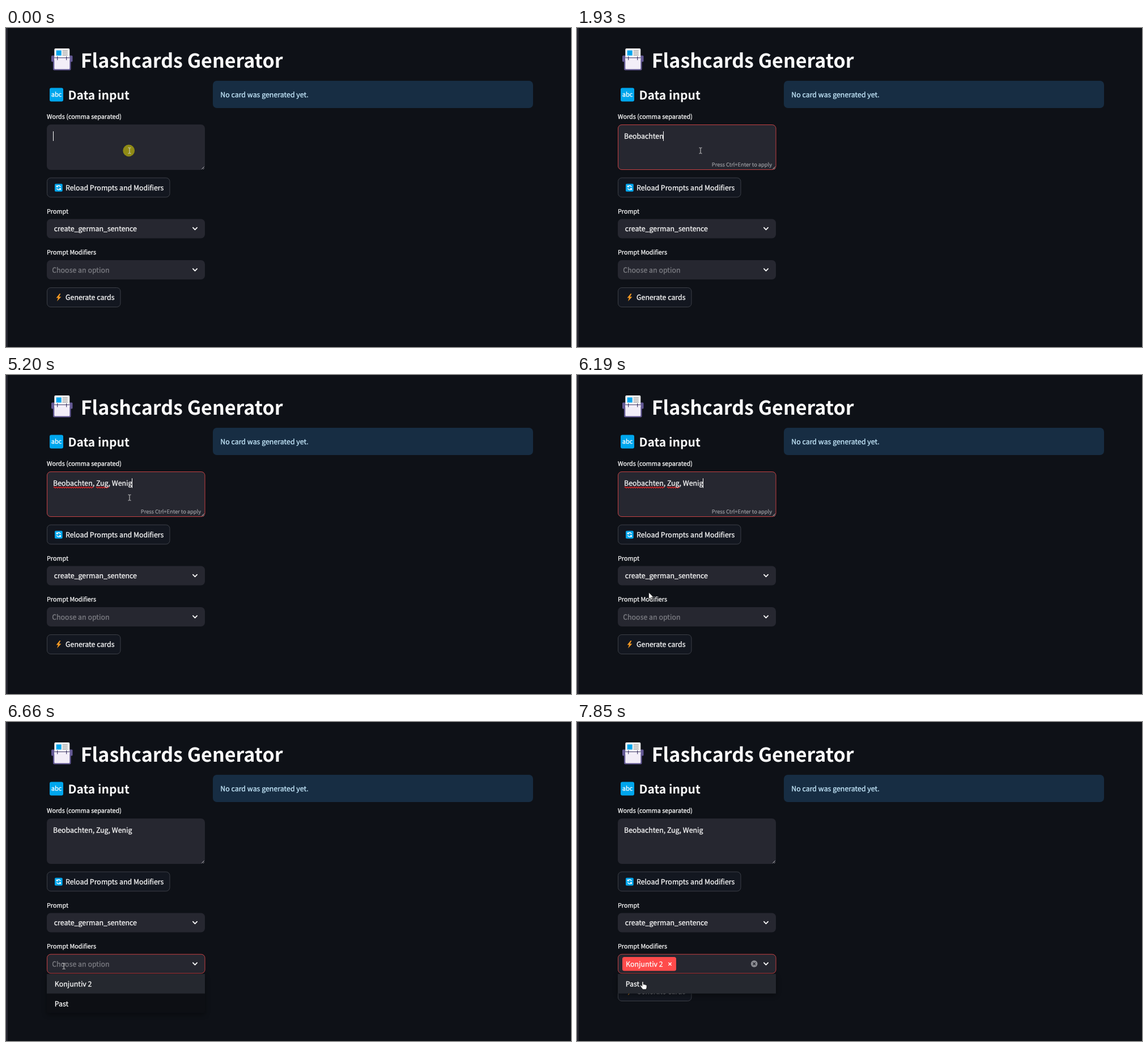
An HTML page for the animation above (7990 ms loop, 997 by 562 pixels).

```html
<!DOCTYPE html>
<html lang="en">
<head>
<meta charset="utf-8">
<title>Flashcards Generator</title>
<style>
  html, body { margin: 0; width: 100%; height: 100%; overflow: hidden; background: #0e1117; }
  svg { display: block; width: 997px; height: 562px; }
  text {
    font: 12.4px "Noto Sans CJK JP", "Noto Sans CJK SC", "Noto Sans CJK KR", "Noto Sans CJK", "Open Sans", sans-serif;
    color: #fafafa; fill: currentColor; stroke: currentColor; stroke-width: .28;
    white-space: pre; text-rendering: geometricPrecision;
  }
  .title { font-size: 34.05px; font-weight: 700; stroke: none; }
  .head { font-size: 21.05px; font-weight: 600; stroke: none; }
  .label { font-size: 10.8px; }
  .hint { font-size: 9.27px; color: #a3a4a8; text-anchor: end; stroke-width: .15; }
  .muted { color: #7d7e84; }
  .info { color: #c7ebff; }
  .abc { font-size: 11px; text-anchor: middle; color: #fff; }
  .field { fill: #262730; }
  .focus { fill: none; stroke: #ff4b4b; stroke-width: .86; }
  .btn { fill: #131720; stroke: #41444c; stroke-width: .9; }
  .line { fill: none; stroke: #fafafa; stroke-width: 1.8; stroke-linecap: round; stroke-linejoin: round; }
  .wave { fill: none; stroke: #f02424; stroke-width: 1.2; }
</style>
</head>
<body>
<svg viewBox="0 0 997 562">
  <defs>
    <path id="chevron" class="line" d="M-3.6-1.8 0 1.8 3.6-1.8"/>
    <filter id="shadow" x="-10%" y="-30%" width="120%" height="180%" color-interpolation-filters="sRGB">
      <feDropShadow dx="0" dy="3" stdDeviation="4" flood-color="#000" flood-opacity=".4"/>
    </filter>
  </defs>
  <rect width="997" height="562" fill="#0e1117"/>
  <rect width="3" height="562" fill="#262730"/>

  <!-- card box icon -->
  <g>
    <rect x="80" y="48.5" width="37.500" height="11" rx="1.5" fill="#635994"/>
    <rect x="83" y="50" width="31.500" height="24.5" rx="2.5" fill="#635994"/>
    <rect x="85.3" y="36" width="27" height="22" rx="2" fill="#f4f4f4"/>
    <rect x="88.7" y="39.5" width="9" height="9" fill="#00a6ed"/>
    <path d="M99.7 40.5h9M99.7 44h9M99.7 47.5h9" stroke="#9b9b9b" stroke-width="1.3"/>
    <rect x="85.3" y="52" width="27" height="20.5" rx="1.5" fill="#f3eef8"/>
    <path d="M85.3 52.5h27M90.7 50v6.5M106.7 50v6.5" stroke="#433b6b" stroke-width="1.2"/>
  </g>
  <text class="title" x="131.7" y="69.5">Flashcards Generator</text>

  <rect x="77" y="105.5" width="24" height="24" rx="3" fill="#00a6ed"/>
  <text class="abc" x="89" y="121">abc</text>
  <text class="head" x="109.4" y="126">Data input</text>

  <rect x="365" y="93" width="565" height="48" rx="7" fill="#172d43"/>
  <text class="info" x="378.3" y="121.6">No card was generated yet.</text>

  <text class="label" x="72" y="160">Words (comma separated)</text>
  <rect class="field" x="72" y="170" width="279" height="80" rx="7"/>
  <rect id="areaFocus" class="focus" x="72.5" y="170.5" width="278.5" height="79" rx="6.5"/>
  <path d="M345.5 248.5l4-4M348.3 248.7l1.2-1.2" stroke="#d5d5d8" stroke-width=".9"/>
  <path id="wave1" class="wave"/>
  <path id="wave2" class="wave"/>
  <text id="words" x="83" y="195.4"></text>
  <rect id="caret" y="182" width="1" height="17" fill="#fafafa"/>
  <text id="hint" class="hint" x="344" y="244">Press Ctrl+Enter to apply</text>

  <rect class="btn" x="72.5" y="264" width="216.5" height="34" rx="6.5"/>
  <rect x="86" y="274.5" width="13.7" height="13.7" rx="1.8" fill="#00a6ed"/>
  <path d="M96.2 280.3a3.6 3.6 0 0 0-6-1.5M89.5 282.4a3.6 3.6 0 0 0 6 1.5" fill="none" stroke="#fff" stroke-width="1.5"/>
  <path d="M88.7 276.8v3.8h3.8zM97 286v-3.8h-3.8z" fill="#fff"/>
  <text x="105" y="286">Reload Prompts and Modifiers</text>

  <text class="label" x="72" y="326.7">Prompt</text>
  <rect class="field" x="72" y="336.5" width="279" height="34" rx="7"/>
  <text x="84.8" y="358.3">create_german_sentence</text>
  <use href="#chevron" x="333.5" y="353.5"/>

  <text class="label" x="72" y="399">Prompt Modifiers</text>
  <rect class="field" x="72" y="409" width="279" height="34" rx="7"/>
  <rect id="selectFocus" class="focus" x="72.5" y="409.2" width="278.5" height="33.6" rx="6.5"/>
  <text id="choose" class="muted" x="81.2" y="431">Choose an option</text>
  <use href="#chevron" x="333.5" y="426"/>
  <g id="tag">
    <rect x="80" y="414" width="95" height="24.5" rx="3.5" fill="#ff4b4b"/>
    <text x="86" y="431">Konjuntiv 2</text>
    <path d="M161.4 423.8l5.2 5.2M166.6 423.8l-5.2 5.2" stroke="#fff" stroke-width="1.4"/>
    <circle cx="312.7" cy="426" r="5.9" fill="#8b8c92"/>
    <path d="M310.5 423.8l4.4 4.4M314.9 423.8l-4.4 4.4" stroke="#262730" stroke-width="1.4"/>
  </g>

  <rect class="btn" x="72.5" y="457.5" width="129.5" height="34" rx="6.5"/>
  <path d="M94.6 468l-6 7.500h3.4l-2 6 7.4-8.100h-3.800l2.800-5.400z" fill="#f59a23"/>
  <text x="105" y="479.2">Generate cards</text>

  <g id="menu">
    <rect id="menuBox" x="72" y="444" width="279" rx="3" fill="#0d0f14" filter="url(#shadow)"/>
    <rect x="72" y="444" width="279" height="34.4" fill="#25282f"/>
    <text id="option1" x="85.8" y="466"></text>
    <text id="option2" x="85.8" y="500.5">Past</text>
  </g>

  <circle id="press" r="10.4" fill="#e6dc00" fill-opacity=".55"/>
  <g id="mouse">
    <path id="beam" d="M-2.5-5h1.8L0-4.3.7-5h1.8M0-4.3v8.6M-2.5 5h1.8L0 4.3.7 5h1.8" fill="none" stroke="#d4d4d4" stroke-width="1"/>
    <path id="arrow" d="M0 0v12l2.8-2.6 1.8 4.2 1.9-.8-1.8-4.1h3.9z" fill="#fff" stroke="#000" stroke-width=".7"/>
    <path id="hand" d="M-1 .8C-1-.6 1.3-.6 1.3.8v4.1c.5-.8 2-.6 2.2.4.6-.7 1.9-.4 2 .6.8-.5 1.8 0 1.8 1v3c0 1.6-1 2-1 3.6H-.2c0-1.7-2.7-3.3-4-6.3-.5-1.3 1-1.8 1.8-.9L-1 7.900z" fill="#fff" stroke="#000" stroke-width=".7"/>
  </g>
</svg>
<script>
  const LOOP = 7990, TEXT = 'Beobachten, Zug, Wenig', LEFT = 83;
  const typedAt = [600, 740, 1000, 1270, 1360, 1450, 1530, 1730, 1830, 1930, 2340,
    2480, 2670, 2870, 3070, 3540, 3740, 4270, 4670, 4800, 5000, 5200];
  const BLUR = 6460, OPEN = 6590, PICK = 7390, SHRINK = 7450;

  const el = {};
  document.querySelectorAll('svg [id]').forEach(n => el[n.id] = n);
  const show = (id, on) => el[id].style.display = on ? '' : 'none';
  const fade = (id, value) => el[id].style.opacity = value;
  const clamp = v => Math.min(1, Math.max(0, v));
  const ease = v => v * v * (3 - 2 * v);

  // Width of the first n typed letters
  function widthOf(n) {
    el.words.textContent = TEXT.slice(0, n);
    return n ? el.words.getComputedTextLength() : 0;
  }

  function wave(from, to) {
    let d = `M${from} 198.2`;
    for (let x = from, up = true; x < to; x += 2, up = !up) d += `q1 ${up ? -2 : 2} 2 0`;
    return d;
  }

  // Stepped mouse moves: start, end, number of steps, from, to
  const moves = [
    [5730, 6390, 10, [218, 216], [101.5, 429]],
    [6590, 7120, 8, [101.5, 429], [116.5, 454.8]],
    [7650, 7850, 4, [116.5, 454.8], [115.8, 457.6]]
  ];

  function mouseAt(t) {
    let pos = moves[0][3];
    for (const [start, end, steps, a, b] of moves) {
      if (t < start) break;
      const gap = (end - start) / (steps - 1);
      const k = ease(clamp((Math.floor((t - start) / gap + 1e-6) + 1) / steps));
      pos = a.map((v, i) => v + (b[i] - v) * k);
    }
    return pos;
  }

  function pointerFor(y) {
    if (y < 250 || (y > 408 && y < 443)) return 'beam';
    if ((y > 264 && y < 298) || (y > 336 && y < 371) || y >= 443) return 'hand';
    return 'arrow';
  }

  function draw(t) {
    const count = typedAt.filter(at => at <= t).length;
    const focused = t < BLUR;
    el.caret.setAttribute('x', Math.round(LEFT + widthOf(count) - .3));
    show('caret', focused);
    show('hint', focused && t >= 600);
    show('wave1', focused && t >= 2480);
    show('wave2', focused && t >= 3800);
    fade('areaFocus', t < 90 ? 0 : t < 140 ? .5 : focused ? .85 : t < 6530 ? .5 : t < OPEN ? .2 : 0);

    const picked = t >= PICK, shrunk = t >= SHRINK;
    fade('selectFocus', t < OPEN ? 0 : t < 6660 ? .5 : .85);
    show('choose', !picked);
    show('tag', picked);
    show('menu', t >= OPEN);
    show('option2', !shrunk);
    el.option1.textContent = shrunk ? 'Past' : 'Konjuntiv 2';
    el.menuBox.setAttribute('height', shrunk ? 34.4 : 68.8);

    const [x, y] = mouseAt(t), kind = pointerFor(y);
    el.mouse.setAttribute('transform', `translate(${x} ${y})`);
    ['beam', 'arrow', 'hand'].forEach(id => show(id, id === kind));
    show('press', t < 90 || (t >= BLUR && t < OPEN) || (t >= 7250 && t < PICK));
    el.press.setAttribute('transform', `translate(${x - 1.3} ${y})`);
  }

  el.wave1.setAttribute('d', wave(LEFT + 1, LEFT + widthOf(10)));
  el.wave2.setAttribute('d', wave(LEFT + widthOf(12), LEFT + widthOf(15)));

  const begin = performance.now();
  function tick() {
    draw((performance.now() - begin) % LOOP);
    requestAnimationFrame(tick);
  }
  tick();
</script>
</body>
</html>
```
